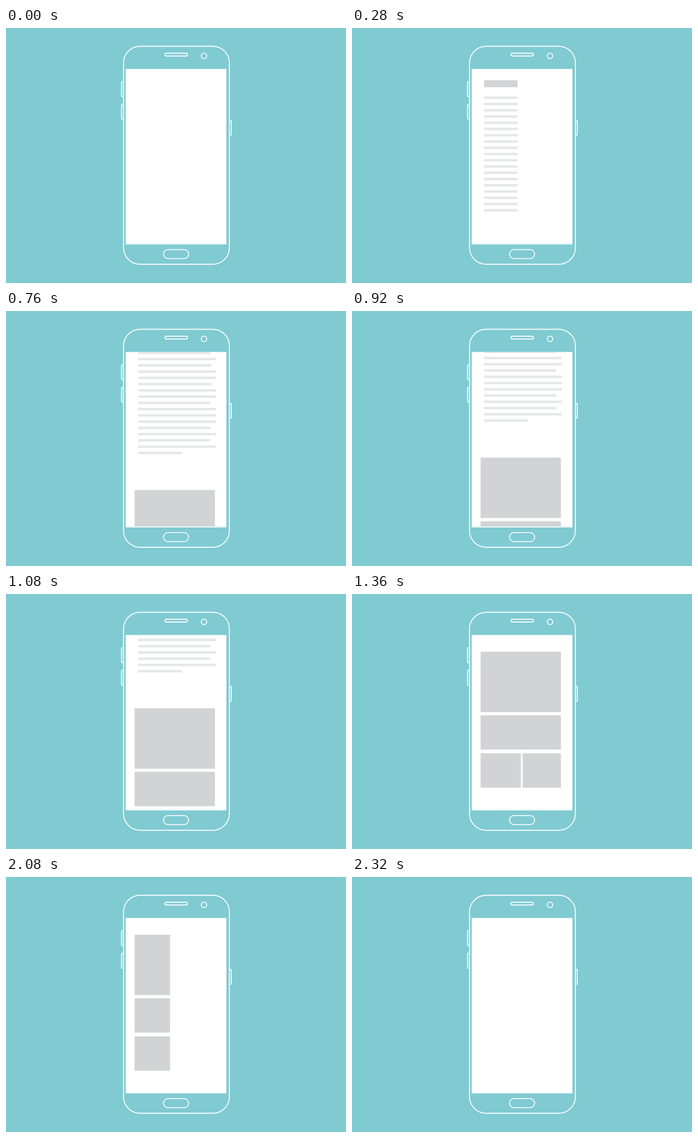
These frames come from a looping animation (512 by 384 pixels, 2.4 s). An HTML page:

```html
<!DOCTYPE html>
<html lang="en">
<head>
<meta charset="utf-8">
<title>Phone page scroll</title>
<style>
  html, body { margin: 0; width: 100%; height: 100%; overflow: hidden; background: #80cad1; }
  svg { display: block; width: 512px; height: 384px; }
  .outline { fill: none; stroke: #fff; stroke-width: 1.4; }
  .dark { fill: #d1d3d4; }
  .light { fill: #e6e7e8; }
</style>
</head>
<body>
<svg viewBox="0 0 512 384">
  <defs>
    <clipPath id="screen"><rect x="180.3" y="62" width="151.6" height="262.3"/></clipPath>
    <clipPath id="textWipe"><rect id="textMask" x="198.7" y="0" width="0" height="384"/></clipPath>
    <clipPath id="blockWipe"><rect id="blockMask" x="193.4" y="0" width="0" height="700"/></clipPath>
  </defs>

  <g class="outline">
    <rect x="177" y="27.5" width="159.4" height="328.3" rx="25"/>
    <path d="M177 81h-1.2q-1.8 0-1.8 2v18.5q0 2 1.8 2h1.2M177 114.7h-1.2q-1.8 0-1.8 2v18.5q0 2 1.8 2h1.2"/>
    <path d="M336.4 139h1.1q1.8 0 1.8 2v18.5q0 2-1.8 2h-1.1"/>
    <rect x="239.3" y="38" width="34" height="4.2" rx="2.1"/>
    <circle cx="298.2" cy="42" r="4.1"/>
    <rect x="237.2" y="333.6" width="37.8" height="13.8" rx="6.9"/>
  </g>

  <rect x="180.3" y="61.7" width="151.6" height="264.2" fill="#fff"/>
  <rect x="181" y="324" width="150.2" height="0.8" fill="#d5eef0"/>

  <g clip-path="url(#screen)">
    <g id="page">
      <g id="text" clip-path="url(#textWipe)">
        <rect class="dark" x="198.7" y="78.6" width="117.3" height="10.6"/>
      </g>
      <g clip-path="url(#blockWipe)">
        <g class="dark" transform="translate(0 243.5)">
          <rect x="193.4" y="86.9" width="121.4" height="91"/>
          <rect x="193.4" y="182.6" width="121.4" height="51.7"/>
          <rect x="193.4" y="239.9" width="60.8" height="51.8"/>
          <rect x="257" y="239.9" width="57.8" height="51.8"/>
        </g>
      </g>
    </g>
  </g>
</svg>

<script>
  const LOOP = 2400, TICK = 40, SCROLL = 243.5;
  const TEXT_W = 117.3, BLOCK_W = 121.4;
  const $ = id => document.getElementById(id);

  // Line lengths: f = full, m = medium, s = short, e = paragraph end
  const lengths = { f: TEXT_W, m: 110.8, s: 109, e: 66.3 };
  [...'fssfmffmffsfffsfsfe'].forEach((kind, i) => {
    const line = document.createElementNS('http://www.w3.org/2000/svg', 'rect');
    line.setAttribute('class', 'light');
    line.setAttribute('x', 198.7);
    line.setAttribute('y', 103.2 + i * 9.415);
    line.setAttribute('width', lengths[kind]);
    line.setAttribute('height', 3.7);
    $('text').append(line);
  });

  const progress = (t, from, to) => Math.min(1, Math.max(0, (t - from) / (to - from)));
  const ease = p => p * p * (3 - 2 * p);

  function draw() {
    // The motion advances in 40 ms ticks
    const t = Math.floor((performance.now() + 0.5) / TICK) * TICK % LOOP;
    const reveal = ease(progress(t, 80, 520));
    const scroll = progress(t, 560, 1360);
    const hide = ease(progress(t, 1800, 2320));

    $('textMask').setAttribute('width', TEXT_W * reveal);
    $('blockMask').setAttribute('width', BLOCK_W * (1 - hide));
    $('page').setAttribute('transform', `translate(0 ${-SCROLL * scroll})`);
    requestAnimationFrame(draw);
  }
  draw();
</script>
</body>
</html>
```
